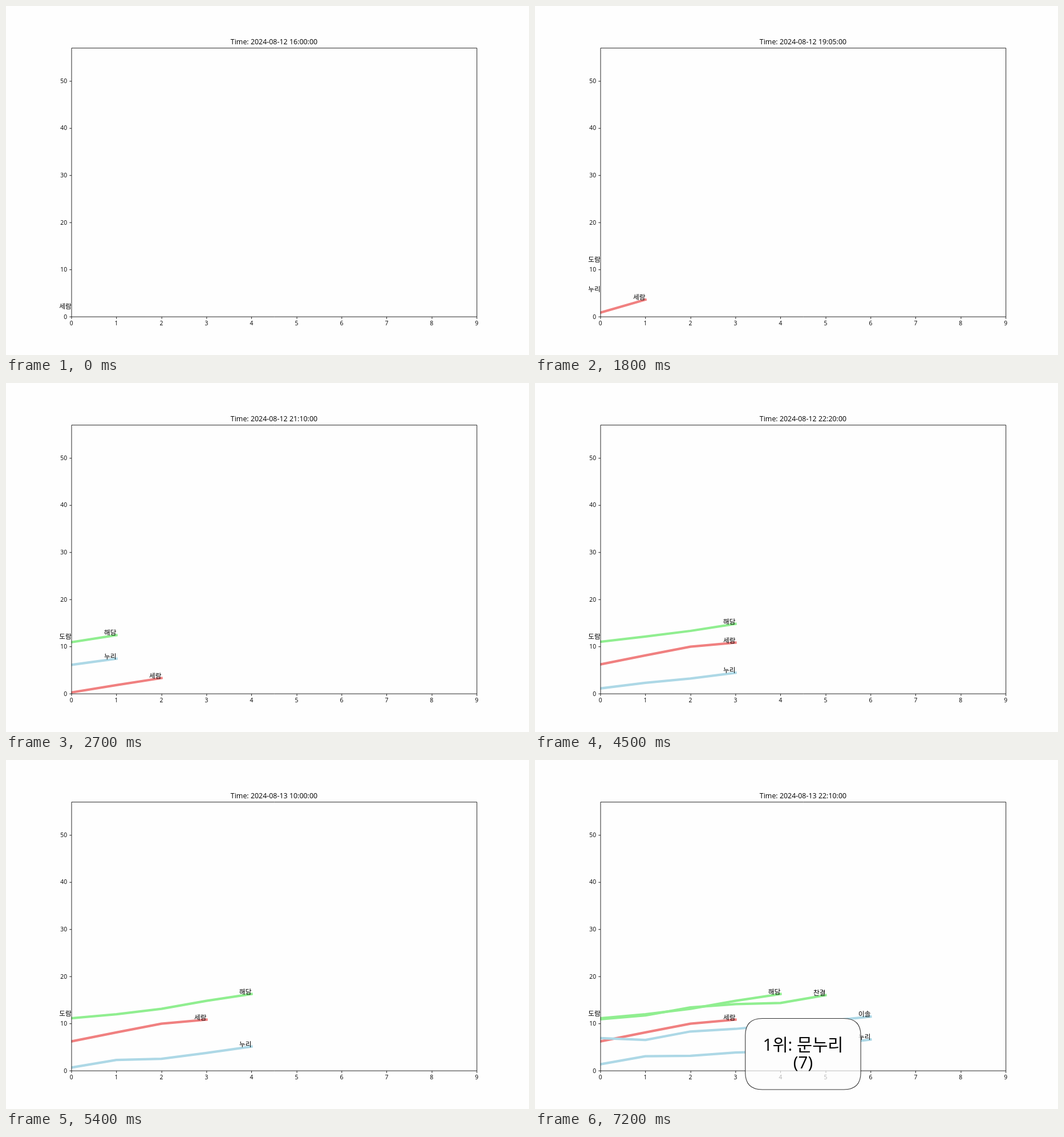
An HTML page with a canvas for the animation above (8.1 s loop, 917 px wide and 611 px high).

```html
<!DOCTYPE html>
<html lang="ko">
<head>
<meta charset="utf-8">
<title>Ranking chart</title>
<style>
html, body { margin: 0; width: 100%; height: 100%; overflow: hidden; background: #fefefe; }
canvas { display: block; }
</style>
</head>
<body>
<canvas id="stage" width="917" height="611"></canvas>
<script>
const ctx = document.getElementById('stage').getContext('2d');
const FONT = '"Open Sans", "Noto Sans CJK KR", "Noto Sans CJK", sans-serif';
const STEP = 900;

// The figure is laid out on 1200 x 800 units and scaled down to the stage.
const WIDTH = 1200, HEIGHT = 800;
ctx.scale(917 / WIDTH, 611 / HEIGHT);
const LEFT = 150, RIGHT = 1080, TOP = 96, BOTTOM = 712;
const HAIRLINE = 1.11, TICK = 4.86;
const px = x => LEFT + x * (RIGHT - LEFT) / 9;
const py = y => BOTTOM - y * (BOTTOM - TOP) / 57;
const snap = v => Math.round(v) + 0.5;

const RED = '#f08080', BLUE = '#add8e6', GREEN = '#90ee90';
const colors = { 세람: RED, 누리: BLUE, 이솔: BLUE, 해담: GREEN, 찬결: GREEN, 도람: GREEN };

const redHigh = [6.2, 8.1, 9.95, 10.8];
const greenHigh = [11.1, 11.95, 13.1, 14.8, 16.25];
const waiting = [11.6];

// Each step: date and time, then every runner's path (one value per hit).
const steps = [
  ['12 16:00', { 세람: [1.65] }],
  ['12 18:00', { 누리: [0.7], 세람: [5.3] }],
  ['12 19:05', { 세람: [0.85, 3.6], 누리: [5.3], 도람: waiting }],
  ['12 21:10', { 세람: [0.25, 1.8, 3.3], 누리: [6.1, 7.4], 해담: [10.9, 12.4], 도람: waiting }],
  ['12 21:25', { 세람: [1.7, 3.1, 4.2, 4.85], 누리: [6.55, 7.4, 8.65], 해담: [10.8, 12.3, 13.85], 도람: waiting }],
  ['12 22:20', { 누리: [1.1, 2.3, 3.2, 4.4], 세람: redHigh, 해담: [11, 12.1, 13.3, 14.8], 도람: waiting }],
  ['13 10:00', { 누리: [0.65, 2.25, 2.5, 3.75, 5.1], 세람: redHigh, 해담: greenHigh, 도람: waiting }],
  ['13 18:00', {
    세람: redHigh, 해담: greenHigh, 도람: waiting,
    누리: [0.65, 2.2, 3.4, 3.8, 5, 6.5],
    이솔: [6.8, 7.1, 8.8, 9.25, 9.85, 10.5],
    찬결: [11.6, 12.5, 13.45, 14.4, 14.65]
  }],
  ['13 22:10', {
    세람: redHigh, 해담: greenHigh, 도람: waiting,
    누리: [1.35, 3.05, 3.15, 3.85, 4.1, 5.4, 6.6],
    이솔: [6.9, 6.5, 8.3, 8.85, 9.7, 10.5, 11.45],
    찬결: [10.9, 11.7, 13.4, 14.1, 14.35, 16]
  }, '1위: 문누리', '(7)']
];

function text(str, x, y, size, align = 'center') {
  ctx.font = `${size}px ${FONT}`;
  ctx.textAlign = align;
  ctx.fillStyle = '#000';
  ctx.fillText(str, x, y);
}

function drawPath(values, color) {
  ctx.beginPath();
  values.forEach((v, i) => ctx.lineTo(px(i), py(v)));
  ctx.strokeStyle = color;
  ctx.lineWidth = 5.56;
  ctx.lineCap = 'square';
  ctx.lineJoin = 'round';
  ctx.stroke();
}

function drawAxes() {
  const left = snap(LEFT), bottom = snap(BOTTOM);
  ctx.beginPath();
  ctx.rect(left, snap(TOP), RIGHT - LEFT, BOTTOM - TOP);
  for (let i = 0; i <= 9; i++) {
    const x = snap(px(i));
    ctx.moveTo(x, bottom);
    ctx.lineTo(x, bottom + TICK);
    text(i, px(i), 732.5, 13.6);
  }
  for (let v = 0; v <= 50; v += 10) {
    const y = snap(py(v));
    ctx.moveTo(left, y);
    ctx.lineTo(left - TICK, y);
    text(v, 140.2, py(v) + 5, 13.6, 'right');
  }
  ctx.strokeStyle = '#000';
  ctx.lineWidth = HAIRLINE;
  ctx.lineCap = 'butt';
  ctx.lineJoin = 'miter';
  ctx.stroke();
}

// Box with parabolic corners.
function winnerBox() {
  const l = 482.5, r = 747.5, t = 592.5, b = 755.5, c = 38.9;
  const box = new Path2D();
  box.moveTo(l + c, t);
  box.lineTo(r - c, t);
  box.quadraticCurveTo(r, t, r, t + c);
  box.lineTo(r, b - c);
  box.quadraticCurveTo(r, b, r - c, b);
  box.lineTo(l + c, b);
  box.quadraticCurveTo(l, b, l, b - c);
  box.lineTo(l, t + c);
  box.quadraticCurveTo(l, t, l + c, t);
  return box;
}

function drawWinner(name, score) {
  const box = winnerBox();
  ctx.fillStyle = 'rgba(254,254,254,0.7)';
  ctx.fill(box);
  ctx.strokeStyle = 'rgba(0,0,0,0.8)';
  ctx.lineWidth = 1.39;
  ctx.stroke(box);
  text(name, 615, 666, 38.6);
  text(score, 615, 707.5, 38.6);
}

function draw([time, paths, winner, score]) {
  ctx.fillStyle = '#fefefe';
  ctx.fillRect(0, 0, WIDTH, HEIGHT);
  const runners = Object.entries(paths);
  ctx.save();
  ctx.beginPath();
  ctx.rect(LEFT, TOP, RIGHT - LEFT, BOTTOM - TOP);
  ctx.clip();
  for (const [name, values] of runners) {
    if (values.length > 1) drawPath(values, colors[name]);
  }
  ctx.restore();
  if (winner) {
    ctx.fillStyle = '#fefefe';
    ctx.fill(winnerBox());
  }
  drawAxes();
  text(`Time: 2024-08-${time}:00`, 615, 87.2, 16.25);
  for (const [name, values] of runners) {
    const last = values.length - 1;
    text(name, px(last), py(values[last]), 15.28, 'right');
  }
  if (winner) drawWinner(winner, score);
}

function tick() {
  draw(steps[Math.floor(performance.now() / STEP) % steps.length]);
  requestAnimationFrame(tick);
}
tick();
</script>
</body>
</html>
```
